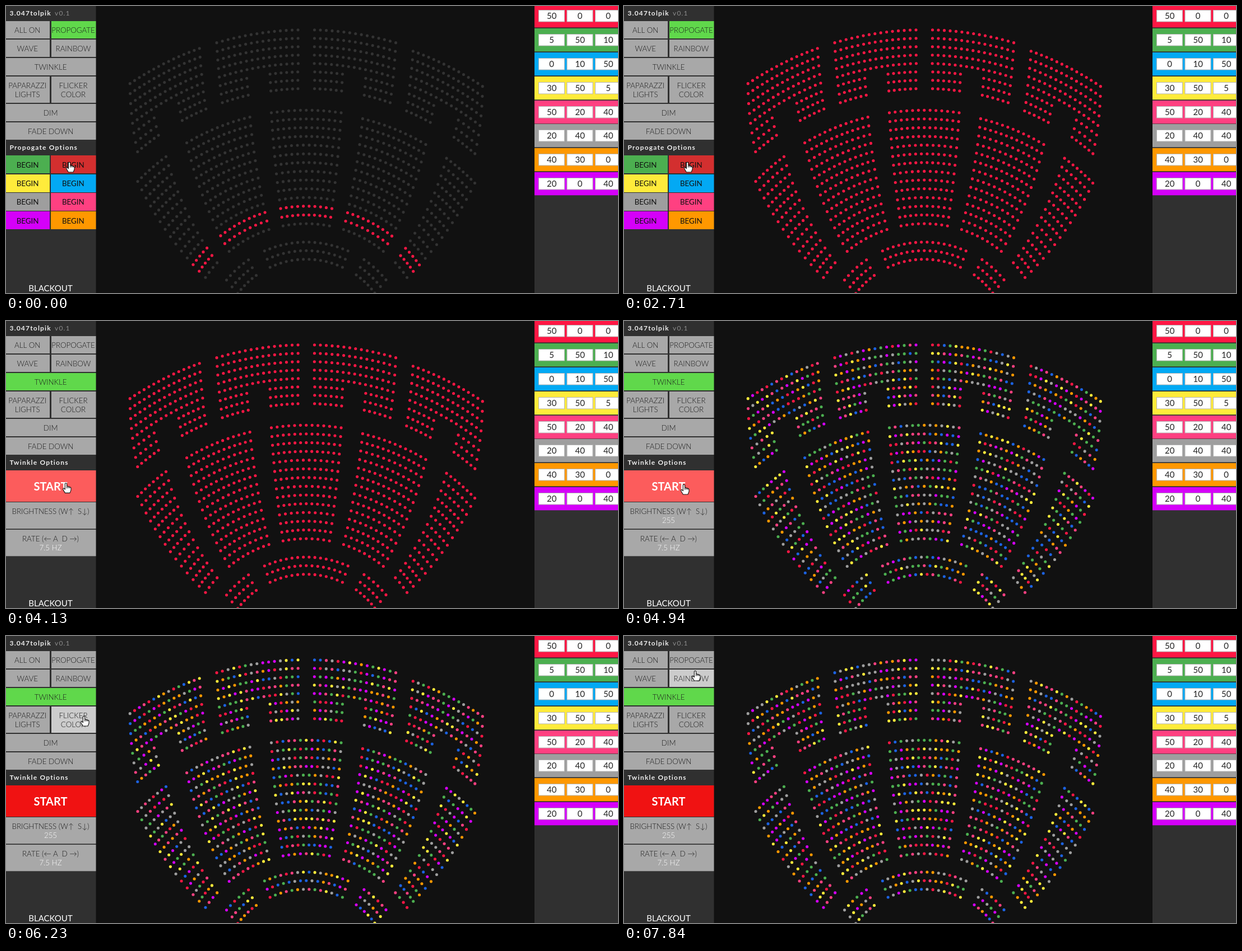
An HTML page with a canvas that plays this animation: 1092x513 px, repeating every 7990 ms.

```html
<!DOCTYPE html>
<html lang="en">
<head>
<meta charset="utf-8">
<title>Seat lights</title>
<style>
  html, body { margin: 0; width: 100%; height: 100%; overflow: hidden; background: #111; }
  canvas { display: block; }
</style>
</head>
<body>
<canvas id="stage" width="1092" height="513"></canvas>
<script>
const ctx = document.getElementById('stage').getContext('2d');
const LOOP = 7990, SIDE = 160.5;
const FONT = 'Lato, "Open Sans", sans-serif';
const RED = '#ff1744', GREEN = '#4caf50', BLUE = '#03a9f4', YELLOW = '#ffeb3b';
const PINK = '#ff4081', GREY = '#9e9e9e', ORANGE = '#ff9800', PURPLE = '#d500f9';
const LIGHTS = [RED, GREEN, '#1c62e0', YELLOW, PINK, GREY, ORANGE, PURPLE];
const PANEL = '#303030', BUTTON = '#a8a8a8', HOVER = '#cccccc', ACTIVE = '#60d84b', INK = '#1c1c1c';

// ---- seats: rows are arcs about one centre, blocks lie between two angles ----
const CX = 535.75, CY = 605, PITCH = 10.3, TAPER = 0.0225;
const balcony = { r: 562.5, step: 15 };
const floor = { r: 418.8, step: 15.6, lights: true };
const front = { r: 183, step: 15.3 };
const seats = [];

// Angles are degrees from the vertical and widen with each row towards the stage.
function block(ring, from, to, inner, outer, outerTaper = TAPER) {
  const central = inner < 0;
  for (let row = from; row <= to; row++) {
    const r = ring.r - ring.step * row;
    const a = inner * (1 + TAPER * row) * Math.PI / 180;
    const b = outer * (1 + outerTaper * row) * Math.PI / 180;
    const gaps = Math.round((b - a) * r / PITCH);
    const drop = inner > 13 ? (r - 215) / 70 : 0;
    for (let i = 0; i <= gaps; i++) {
      const angle = a + (b - a) * i / gaps;
      const x = r * Math.sin(angle), y = CY - r * Math.cos(angle);
      const level = ring.lights ? row : -1;
      seats.push({ x: CX - x, y, level });
      if (!central) seats.push({ x: CX + x, y: y + drop, level });
    }
  }
}

block(balcony, 0, 4, 1.5, 16.5);
block(balcony, 5, 7, 1.6, 6.85);
block(balcony, 5, 7, 11.3, 16.5);
block(balcony, 0, 4, 19.8, 34, 0.03);
block(balcony, 5, 7, 19.9, 25);
block(balcony, 5, 7, 30.4, 34, 0.03);
block(floor, 0, 13, -8.55, 8.55);
block(floor, 0, 13, 13.9, 30.6);
block(floor, 0, 13, 36.7, 45.9, 0.0175);
block(front, 0, 2, -24, 24);
block(front, 0, 2, 34.3, 51);

// ---- timing ----
const STEPS = 12, CLICK = 3750, VALUE = 4520, START = 4740, RATE = 7.5;

// The red front starts slowly and speeds up towards the back.
const spreadTime = k => 160 + 245 * k - 8.64 * k * k;

function spreadCount(t) {
  let k = 0;
  while (k < STEPS && t >= spreadTime(k)) k++;
  return k;
}

const stops = [
  { from: 2710, to: 2990, x: 115, y: 363 },
  { from: 3140, to: 3280, x: 104, y: 110 },
  { from: 3750, to: 4160, x: 107, y: 292 },
  { from: 5250, to: 6230, x: 139, y: 143 },
  { from: 6280, to: 7100, x: 127, y: 62 }
];

function pointer(t) {
  const p = { x: 113, y: 279 };
  for (const s of stops) {
    const u = Math.min(1, Math.max(0, (t - s.from) / (s.to - s.from)));
    const k = u * u * (3 - 2 * u);
    p.x += (s.x - p.x) * k;
    p.y += (s.y - p.y) * k;
  }
  return p;
}

function pick(i, tick) {
  let h = Math.imul(i + 1, 0x9e3779b1) ^ Math.imul(tick + 7, 0x85ebca6b);
  h = Math.imul(h ^ (h >>> 15), 0x2c1b3c6d);
  h = Math.imul(h ^ (h >>> 12), 0x297a2d39);
  return LIGHTS[(h ^ (h >>> 15)) >>> 29];
}

// ---- drawing ----
function rect(x, y, w, h, color) {
  ctx.fillStyle = color;
  ctx.fillRect(x, y, w, h);
}

// y is the middle of the capitals
function text(str, x, y, size, weight, color, align = 'center') {
  ctx.font = `${weight} ${size}px ${FONT}`;
  ctx.textAlign = align;
  ctx.fillStyle = color;
  ctx.fillText(str, x, y + size * 0.36);
}

function heading(str, x, y, weight, color) {
  ctx.letterSpacing = '1.2px';
  text(str, x, y, 12, weight, color, 'left');
  ctx.letterSpacing = '0px';
}

const label = (str, x, y, color = INK) => text(str, x, y, 13.33, 300, color);
const inside = (p, x, y, w, h) => p.x >= x && p.x < x + w && p.y >= y && p.y < y + h;

const modes = [
  ['ALL ON', 'PROPOGATE'],
  ['WAVE', 'RAINBOW'],
  ['TWINKLE'],
  ['PAPARAZZI LIGHTS', 'FLICKER COLOR'],
  ['DIM'],
  ['FADE DOWN']
];
const begins = [GREEN, RED, YELLOW, BLUE, GREY, PINK, PURPLE, ORANGE];
const beginHover = { [RED]: '#d32f2f', [BLUE]: '#0288d1', [PINK]: '#e91e63' };
const mixes = [
  [RED, '50 0 0'], [GREEN, '5 50 10'], [BLUE, '0 10 50'], [YELLOW, '30 50 5'],
  [PINK, '50 20 40'], [GREY, '20 40 40'], [ORANGE, '40 30 0'], [PURPLE, '20 0 40']
];

function drawSeats(t) {
  const count = spreadCount(t), first = STEPS - 1 - count, full = count === STEPS;
  const tick = Math.floor((t - START) * RATE / 1000);
  seats.forEach((s, i) => {
    const lit = full || (s.level >= Math.max(0, first) && s.level < 13);
    ctx.fillStyle = tick >= 0 ? pick(i, tick) : lit ? RED : '#333333';
    ctx.beginPath();
    ctx.arc(s.x, s.y, 2.55, 0, Math.PI * 2);
    ctx.fill();
  });
}

function drawModes(p, active) {
  let y = 27;
  for (const row of modes) {
    const tall = row.length > 1 && row[0].includes('LIGHTS');
    const step = tall ? 48.9 : 33.1, top = Math.round(y), h = Math.round(step - 1.8);
    row.forEach((name, i) => {
      const x = i * 81, w = row.length > 1 && !i ? 78 : SIDE - x;
      const mid = x + w / 2 - (row.length > 1 ? 0.8 : 0.6);
      rect(x, top, w, h, name === active ? ACTIVE : inside(p, x, top, w, h) ? HOVER : BUTTON);
      const lines = tall ? name.split(' ') : [name];
      lines.forEach((line, k) => label(line, mid, y + 16.4 + k * 15.4));
    });
    y += step;
  }
}

function drawBegins(p) {
  begins.forEach((color, i) => {
    const right = i % 2, x = right * 80, w = right ? SIDE - x : 78;
    const y = 267.4 + (i >> 1) * 33.3, top = Math.round(y);
    rect(x, top, w, 32, inside(p, x, top, w, 32) && beginHover[color] || color);
    text('BEGIN', x + w / 2 - 0.4, y + 16.5, 13.33, 400, '#111');
  });
}

function drawSetting(name, value, y) {
  rect(0, y, SIDE, 47.3, BUTTON);
  label(name, 79.5, y + 16.2);
  label(value, 79.5, y + 32.4, '#fff');
}

function drawTwinkle(p, t) {
  rect(0, 267, SIDE, 56, inside(p, 0, 267, SIDE, 56) ? '#fc5c5c' : '#f01212');
  text('START', 79.5, 296, 20, 700, '#fff');
  drawSetting('BRIGHTNESS (W↑\u00a0\u00a0S↓)', t < VALUE ? '' : '255', 324);
  drawSetting('RATE (←\u00a0A\u00a0\u00a0D\u00a0→)', '7.5 HZ', 373);
}

function drawMixes() {
  rect(943, 0, 149, 513, PANEL);
  mixes.forEach(([color, values], i) => {
    const y = Math.round(42.83 * i - 2.7);
    rect(943, y, 149, 41.3, color);
    values.split(' ').forEach((v, k) => {
      const x = 950 + k * 50.5;
      rect(x, y + 10, 47, 21.5, '#b4b4b4');
      rect(x + 1, y + 11, 45, 19.5, '#fff');
      text(v, x + 23.7, y + 21, 15, 400, '#222');
    });
  });
}

const hand = new Path2D('M-1.6 1.2Q0 -.6 1.6 1.2V6.2Q3.2 5.4 4.3 6.8Q6 6.2 7 7.7' +
  'Q9 7.4 9 9.4V13L7 18H-1.6L-5 12.2Q-6 9.8 -4 9.4L-1.6 11.6Z');

function drawPointer(p) {
  ctx.save();
  ctx.translate(p.x, p.y);
  ctx.fillStyle = '#fff';
  ctx.strokeStyle = '#111';
  ctx.lineWidth = 1.1;
  ctx.lineJoin = 'round';
  ctx.fill(hand);
  ctx.stroke(hand);
  ctx.beginPath();
  for (let x = 1.6; x < 7; x += 2.5) {
    ctx.moveTo(x, 6.8);
    ctx.lineTo(x, 9.5);
  }
  ctx.stroke();
  ctx.restore();
}

function draw(t) {
  const p = pointer(t), twinkle = t >= CLICK;
  rect(0, 0, 1092, 513, '#111111');
  drawSeats(t);
  rect(0, 0, SIDE, 513, PANEL);
  heading('3.047tolpik', 6.5, 12.5, 700, '#eee');
  heading('v0.1', 87, 12.5, 400, '#8c8c8c');
  drawModes(p, twinkle ? 'TWINKLE' : 'PROPOGATE');
  heading(twinkle ? 'Twinkle Options' : 'Propogate Options', 6.5, 253, 700, '#eee');
  if (twinkle) drawTwinkle(p, t);
  else drawBegins(p);
  text('BLACKOUT', 79.5, 505, 15, 400, '#fff');
  drawMixes();
  drawPointer(p);
}

const begun = performance.now();
function loop() {
  draw((performance.now() - begun) % LOOP);
  requestAnimationFrame(loop);
}
loop();
</script>
</body>
</html>
```
